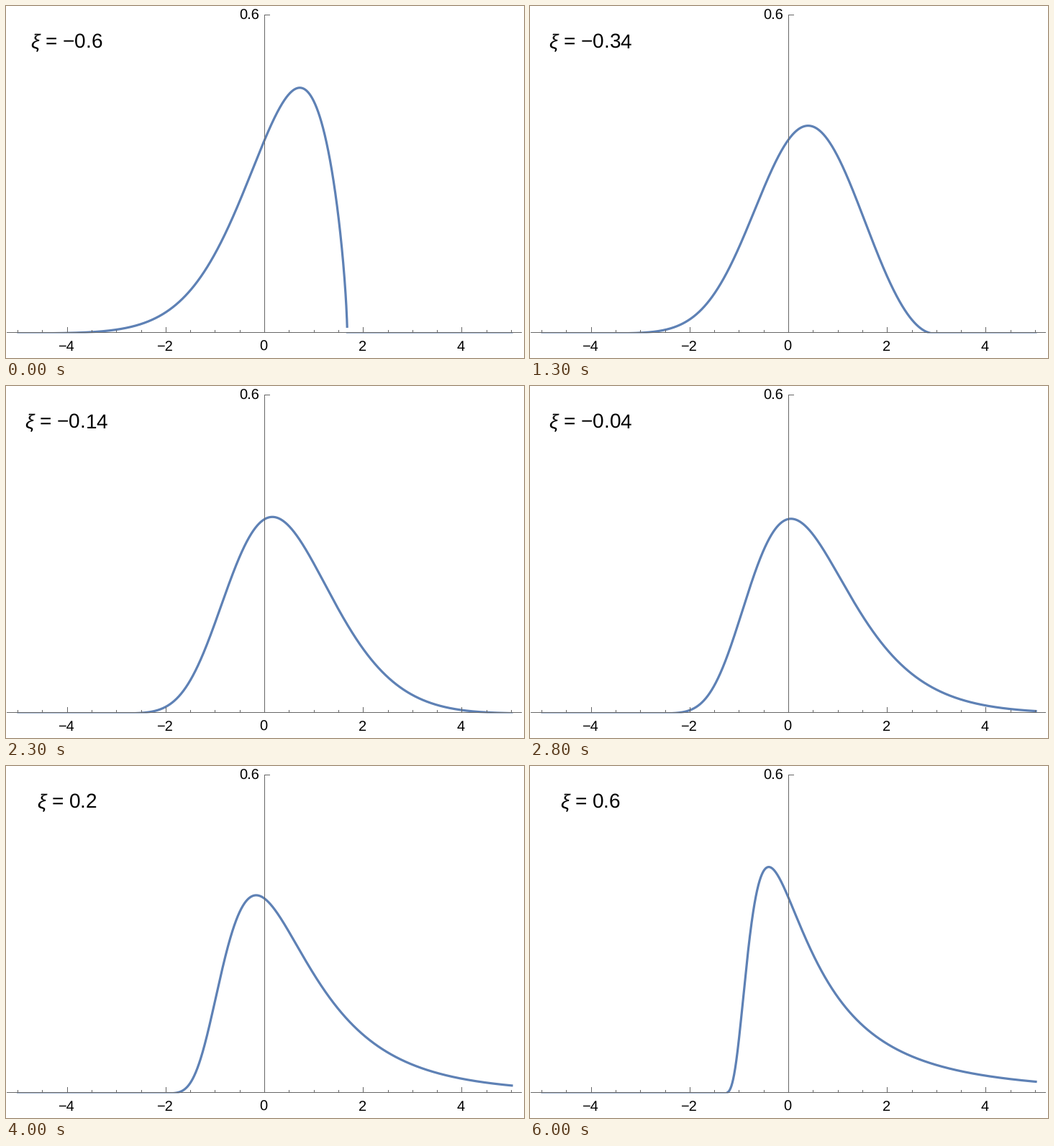
Write a matplotlib script that moves like this. It is 720 by 490 pixels and loops after 6.1 s.

```python
import numpy as np
import matplotlib.pyplot as plt
from matplotlib.animation import FuncAnimation
from matplotlib.patches import Rectangle

W, H, DPI = 720, 490, 100
FRAMES, INTERVAL = 61, 100
PT = 72 / DPI                      # points per pixel
X0, Y0 = 360, 456                  # pixel position of the curve's zero
SX, SY = 68.6, 736.5               # pixels per unit
AXIS_X, AXIS_Y = 359.5, 454.5      # centre lines of the axes
GREY, BLUE = "#666666", "#5e81b5"
GAP = 0.0025                       # sampling gap at the edge of the support

plt.rcParams.update({
    "font.family": "Liberation Sans",
    "text.hinting": "none",
    "mathtext.fontset": "custom",
    "mathtext.rm": "Liberation Sans",
    "mathtext.it": "Liberation Sans:italic",
    "mathtext.default": "regular",
})

fig = plt.figure(figsize=(W / DPI, H / DPI), dpi=DPI, facecolor="white")
ax = fig.add_axes([0, 0, 1, 1])
ax.set_xlim(0, W)
ax.set_ylim(H, 0)
ax.axis("off")


def rule(xs, ys):
    """One-pixel line; coordinates already sit on pixel centres."""
    ax.plot(xs, ys, color=GREY, lw=PT, solid_capstyle="butt",
            snap=False, zorder=4)


def label(x, y, text, size, ha="center"):
    return ax.text(x, y, text, fontsize=size * PT, color="black",
                   ha=ha, va="baseline", zorder=5)


def draw_axes():
    rule([1, 717], [AXIS_Y, AXIS_Y])
    rule([AXIS_X, AXIS_X], [12, 455])
    rule([AXIS_X, 367], [12.5, 12.5])
    label(352.5, 19, "0.6", 20, ha="right")
    for k in range(-10, 11):
        x = AXIS_X + k / 2 * SX
        mid = np.floor(x) + 0.5
        major = k % 4 == 0
        if k:
            rule([mid, mid], [AXIS_Y, 447 if major else 451])
        if major:
            label(x - 1.5, 480, str(k // 2).replace("-", "\u2212"), 20)


def density(x, xi):
    """Generalized extreme value density inside its support."""
    log_t = -x if xi == 0 else -np.log1p(xi * x) / xi
    log_t = np.minimum(log_t, 50)
    return np.exp((xi + 1) * log_t - np.exp(log_t))


def curve_points(xi):
    lo, hi = -5.0, 5.0
    if xi > 0:
        lo = max(lo, -1 / xi + GAP)
    elif xi < 0:
        hi = min(hi, -1 / xi - GAP)
    x = np.linspace(lo, hi, 1500)
    y = density(x, xi)
    if lo > -5:
        x = np.r_[-5, lo, np.nan, x]
        y = np.r_[0, 0, np.nan, y]
    if hi < 5:
        x = np.r_[x, np.nan, hi + 2 * GAP, 5]
        y = np.r_[y, np.nan, 0, 0]
    return X0 + SX * x, Y0 - SY * y


def caption(step):
    value = f"{step / 50:.2f}".rstrip("0") if step else "0."
    return r"$\mathit{\xi}$ = " + value.replace("-", "\u2212")


draw_axes()
curve, = ax.plot([], [], color=BLUE, lw=3.2 * PT, solid_capstyle="projecting",
                 solid_joinstyle="round", snap=False, zorder=2)
# Cuts the curve off at the bottom of the plot range.
ax.add_patch(Rectangle((0, 455.5), W, 8, color="white", lw=0, snap=False, zorder=3))
title = label(84.5, 59, "", 28)


def update(i):
    step = i - 30
    curve.set_data(*curve_points(step / 50))
    title.set_text(caption(step))
    return curve, title


anim = FuncAnimation(fig, update, frames=FRAMES, interval=INTERVAL,
                     repeat=True, repeat_delay=0, blit=False)
plt.show()
```
